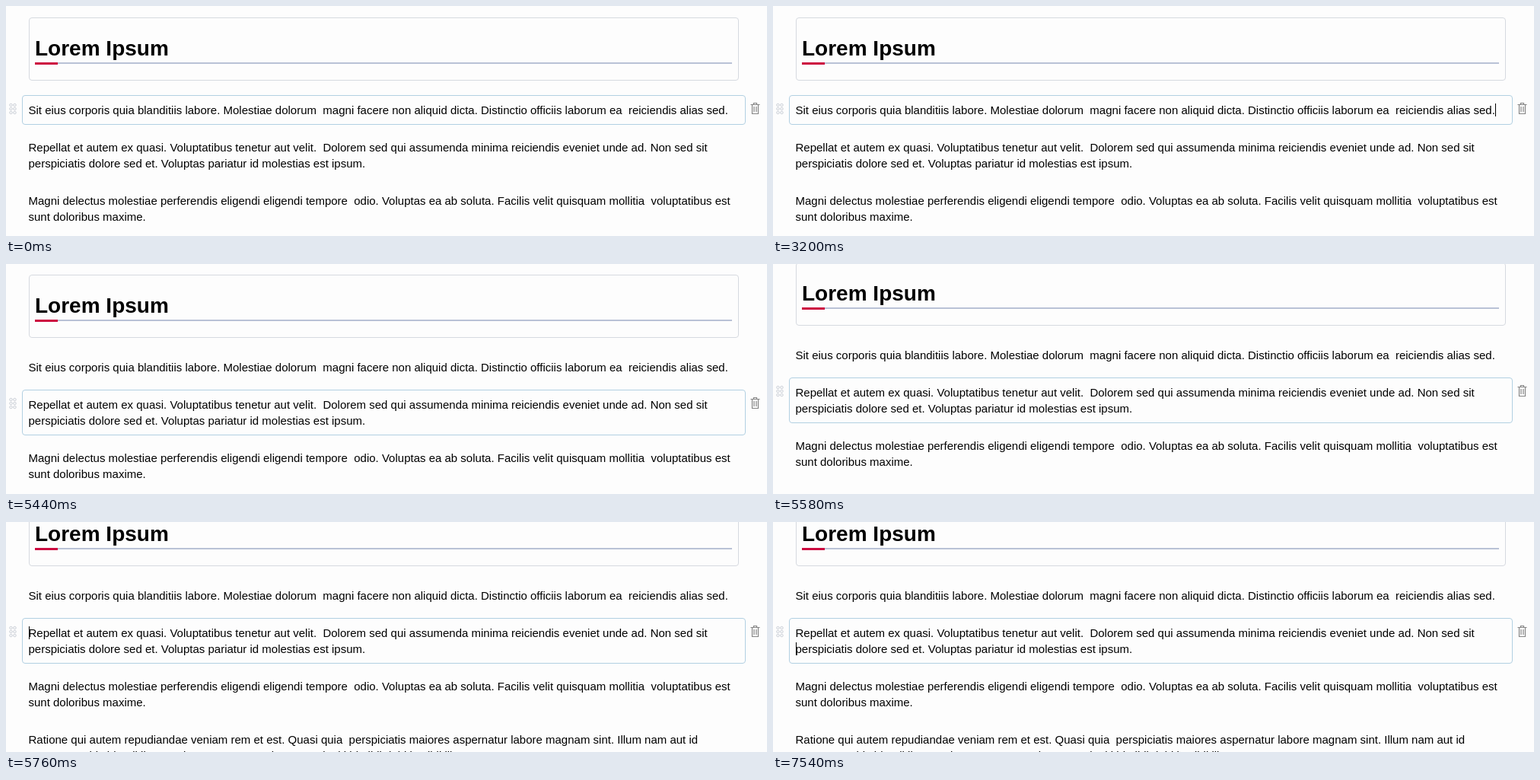
An HTML page for the animation above (8000 ms loop, 1000 px wide and 302 px high).

```html
<!DOCTYPE html>
<html lang="la">
<head>
<meta charset="utf-8">
<title>Lorem Ipsum</title>
<style>
  html, body { margin: 0; width: 100%; height: 100%; overflow: hidden; background: #fdfdfd; }
  #stage { position: relative; width: 1000px; height: 302px; overflow: hidden; contain: strict; }
  #page { position: absolute; left: 0; top: 0; width: 1000px; height: 302px;
          font: 15px/21px "Liberation Sans", Arial, sans-serif; color: #000; }
  #page > * { position: absolute; box-sizing: border-box; margin: 0; }
  #title { left: 30px; top: 15px; width: 933px; height: 83px;
           border: 1px solid #d6dae0; border-radius: 4px; }
  h1 { left: 38px; top: 40px; font-size: 28px; line-height: 31px; white-space: pre; }
  #rule { left: 38px; top: 74px; width: 916px; height: 2px; background: #b9c2d6; }
  #accent { left: 38px; top: 74px; width: 30px; height: 3px; background: #cc0a40; }
  p { left: 29.5px; white-space: pre; }
  #focus { left: 21px; width: 951px; border: 1px solid #b2d0e2; border-radius: 4px; }
  #icons { left: 0; width: 1000px; height: 20px; fill: none; }
  #grip { stroke: #c9ced6; stroke-width: 1; }
  #trash { stroke: #868686; stroke-width: 1.2; }
  #caret { width: 1px; height: 17px; background: #000; }
</style>
</head>
<body>
<div id="stage">
<div id="page">
  <div id="title"></div>
  <h1>Lorem Ipsum</h1>
  <div id="rule"></div>
  <div id="accent"></div>
  <div id="focus"></div>
  <p style="top:126px">Sit eius corporis quia blanditiis labore. Molestiae dolorum  magni facere non aliquid dicta. Distinctio officiis laborum ea  reiciendis alias sed.</p>
  <p style="top:175px">Repellat et autem ex quasi. Voluptatibus tenetur aut velit.  Dolorem sed qui assumenda minima reiciendis eveniet unde ad. Non sed sit
perspiciatis dolore sed et. Voluptas pariatur id molestias est ipsum.</p>
  <p style="top:245px">Magni delectus molestiae perferendis eligendi eligendi tempore  odio. Voluptas ea ab soluta. Facilis velit quisquam mollitia  voluptatibus est
sunt doloribus maxime.</p>
  <p style="top:315px">Ratione qui autem repudiandae veniam rem et est. Quasi quia  perspiciatis maiores aspernatur labore magnam sint. Illum nam aut id
accusamus hic blanditiis ut maiores  tempora voluptas. Deleniti id nihil debitis nihil illo.</p>
  <svg id="icons">
    <g id="grip"></g>
    <path id="trash" d="M978.5 3.5H990.5M982.5 3.5V1.5H986.5V3.5M980.5 3.5V15.5H988.5V3.5M983 6V13M986 6V13"/>
  </svg>
  <div id="caret"></div>
</div>
</div>
<script>
const LOOP = 8000;
const SCROLL = { start: 5410, length: 370, distance: 40 };

// time, top and height of the focused block
const focusSteps = [
  [0, 117, 39],
  [5300, 166, 60]
];

// time, left and top of the caret; no position means hidden
const caretSteps = [
  [0],
  [300, 30, 128],
  [3060, 949, 128],
  [4740],
  [5700, 30, 177],
  [6980, 30, 198]
];

const $ = id => document.getElementById(id);
const [page, focusBox, icons, caret] = ["page", "focus", "icons", "caret"].map($);

for (const x of [6.5, 11.5])
  for (const y of [4, 9, 14])
    $("grip").innerHTML += `<circle cx="${x}" cy="${y}" r="1.7"/>`;

const stepAt = (steps, t) => steps.filter(s => s[0] <= t).pop();

// ease-in-out bezier (.42, 0, .58, 1), solved by bisection
function ease(p) {
  let lo = 0, hi = 1, u = 0.5;
  for (let i = 0; i < 20; i++) {
    u = (lo + hi) / 2;
    const x = 3 * u * (1 - u) ** 2 * 0.42 + 3 * u * u * (1 - u) * 0.58 + u ** 3;
    if (x < p) lo = u; else hi = u;
  }
  return u * u * (3 - 2 * u);
}

function draw(t) {
  const p = Math.min(1, Math.max(0, (t - SCROLL.start) / SCROLL.length));
  page.style.top = -Math.round(SCROLL.distance * ease(p)) + "px";

  const [, top, height] = stepAt(focusSteps, t);
  focusBox.style.top = top + "px";
  focusBox.style.height = height + "px";
  icons.style.top = top + 9 + "px";

  const [, x, y] = stepAt(caretSteps, t);
  caret.style.visibility = x === undefined ? "hidden" : "visible";
  caret.style.left = (x || 0) + "px";
  caret.style.top = (y || 0) + "px";
}

const begin = performance.now();
function tick() {
  draw((performance.now() - begin) % LOOP);
  requestAnimationFrame(tick);
}
draw(0);
requestAnimationFrame(tick);
</script>
</body>
</html>
```
